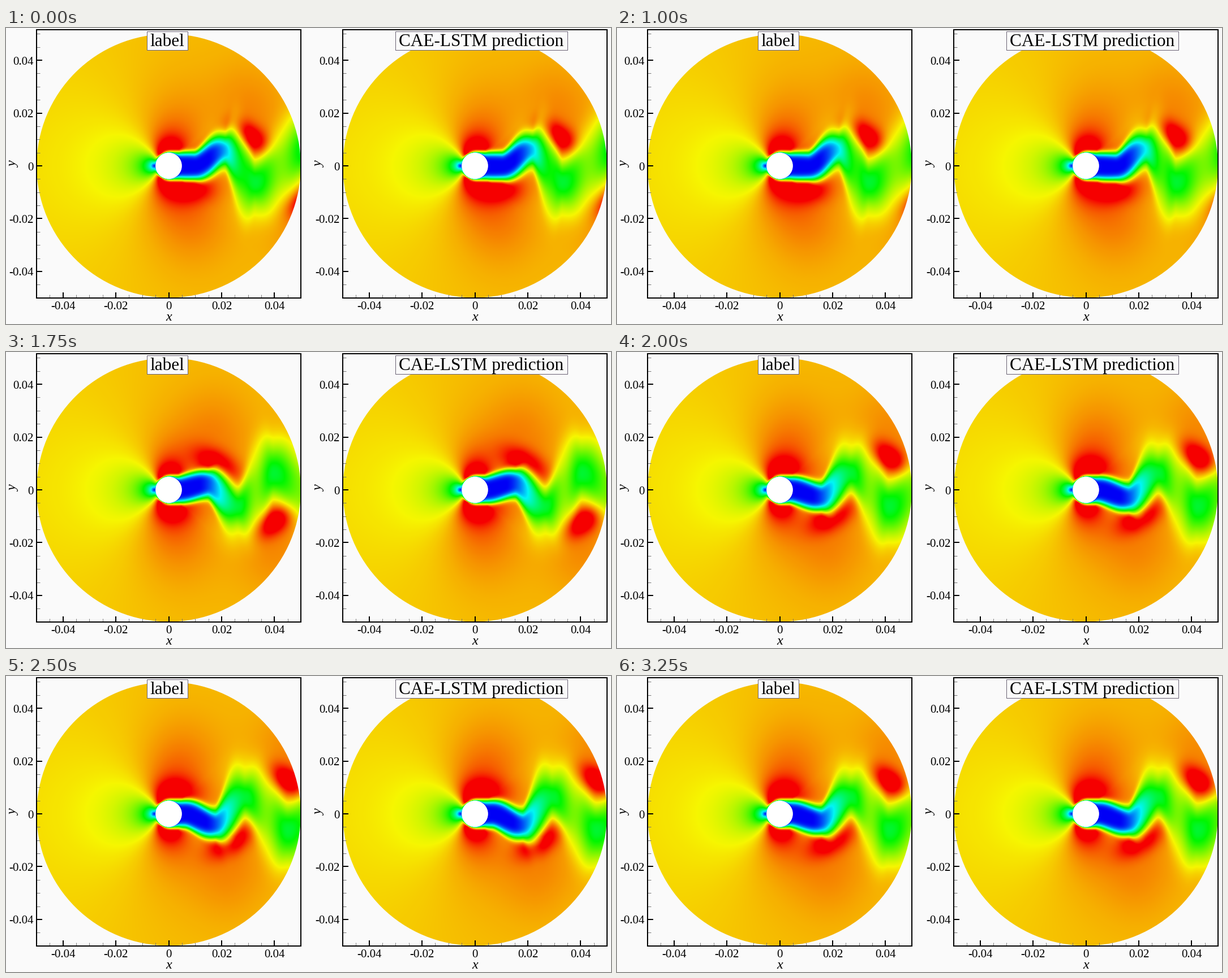
Animation of 1069x524 px, one loop 3.5 s. Source, as a matplotlib script:

```python
import numpy as np
import matplotlib.pyplot as plt
from matplotlib.animation import FuncAnimation
from matplotlib.colors import LinearSegmentedColormap
from matplotlib.patches import Circle, Rectangle

W, H, DPI = 1069, 524, 64
STEPS = 14
R = 23.3            # cylinder radius in pixels
DISK = 233.4        # radius of the flow domain
UNIT = 23.37        # pixels per 0.005 on the axes
HALF = 102.5        # half of the vortex spacing
CX, CY = 287.5, 244
PAPER = "#fafafa"
SERIF = "Liberation Serif"

rainbow = LinearSegmentedColormap.from_list(
    "rainbow5",
    [(0, 0, .965), (0, .965, .965), (0, .965, 0), (.965, .965, 0), (.965, 0, 0)],
    N=1024)

xs = np.arange(-233.5, 234)
X, Y = np.meshgrid(xs, -xs)


def px(size):
    return size * 72 / DPI


def bump(x, y, sx, sy):
    return np.exp(-(x / sx) ** 2 / 2 - (y / sy) ** 2 / 2)


def ramp(x, start, end):
    t = np.clip((x - start) / (end - start), 0, 1)
    return t * t * (3 - 2 * t)


def phase_at(n):
    """Distance travelled by the vortex street, a bit over HALF per step."""
    return np.interp(n, [0, 2, 4, 7, 9, 11, 13],
                     [141, 326, 560, 903, 1123, 1348, 1628])


def outer_flow():
    """Potential flow round a cylinder plus a source for its wake."""
    r2 = np.maximum(X ** 2 + Y ** 2, R ** 2)
    q = R ** 2 / r2
    c = (X ** 2 - Y ** 2) / r2
    c = np.where((X > 0) & (c > 0), .3 * c, c)
    u = 1 - q * c + 5.5 * X / r2
    v = -2 * q * X * Y / r2 + 5.5 * Y / r2
    layer = 1 - np.exp(-(np.sqrt(r2) - R + .3) / 1.6)
    return np.hypot(u, v) / 1.25 * layer


OUTER = outer_flow()


def slow_spot(age):
    """Slow side of a vortex: forms behind the cylinder, then drifts."""
    return np.maximum(78 + .53 * age, age), 29 * ramp(age, -70, 60)


def fast_spot(age):
    """Fast side of a vortex: clings to the cylinder, then drifts."""
    return 10 + 18 * np.logaddexp(0, (age - 10) / 18), 37 + .1 * age


def wake(phase, ages, signs):
    """Value along the slow band and its blending mask."""
    kx, ky = slow_spot(ages)
    ky = -signs * ky
    i = np.clip(np.searchsorted(kx, xs) - 1, 0, len(kx) - 2)
    t = np.clip((xs - kx[i]) / (kx[i + 1] - kx[i]), 0, 1)
    yc = ky[i] + (ky[i + 1] - ky[i]) * ramp(t, 0, 1)
    slope = np.gradient(yc, xs)

    tip = 60 - 9 + 17 * abs(np.sin(np.pi * (phase - 83) / HALF))
    val = .45 * ramp(xs, tip, tip + 75)
    val = val + .17 * ramp(ages[i], 0, 90) * np.sin(np.pi * t) ** 2

    width = 25 + 18 * ramp(xs, 60, 220)
    power = 5 - 2.8 * ramp(xs, 20, 120)
    d = np.abs(Y - yc) / np.sqrt(1 + slope ** 2)
    return val, np.exp(-(d / width) ** power) * ramp(xs, -20, 4)


def field(phase):
    ks = np.arange(-4, 4)
    ages = phase % (2 * HALF) + HALF * ks
    signs = np.where(ks % 2 == 0, 1, -1)
    s = OUTER.copy()
    for age, sign in zip(ages, signs):
        x, y = fast_spot(age)
        dx, dy = X - x, sign * Y - y
        tilt = .4 * ramp(age, 30, 100)
        s += .27 * ramp(age, -110, 120) * bump(dx, dy + tilt * dx, 28 - .03 * age, 17)
        s += .045 * ramp(age, -100, 20) * bump(dx, dy - 45, 45, 58)
        x, y = slow_spot(age)
        s -= .08 * ramp(age, 0, 100) * bump(X - x, -sign * Y - y - 38, 24, 27)
    val, mask = wake(phase, ages, signs)
    s = np.clip(s, 0, 1.1)
    return np.clip(s * (1 - mask) + val * mask, 0, 1)


fig = plt.figure(figsize=(W / DPI, H / DPI), dpi=DPI, facecolor=PAPER)
ax = fig.add_axes([0, 0, 1, 1])
ax.axis("off")


def line(x0, y0, x1, y1, width, color):
    ax.plot([x0, x1], [y0, y1], color=color, lw=px(width),
            solid_capstyle="butt", zorder=4)


def text(x, y, s, size, ha="center", **kw):
    ax.text(x, y, s, fontsize=px(size), family=SERIF, color="black",
            ha=ha, zorder=7, **{"va": "baseline", **kw})


def panel(dx, title, half_box):
    cx = CX + dx
    im = ax.imshow(field(phase_at(0)), cmap=rainbow, vmin=0, vmax=1,
                   extent=(cx - 234, cx + 234, CY + 234, CY - 234),
                   interpolation="bilinear", zorder=1)
    im.set_clip_path(Circle((cx, CY), DISK, transform=ax.transData))
    ax.add_patch(Circle((cx, CY), R, fc="white", ec="none", zorder=3))

    left, right, top, bottom = 54 + dx, 521 + dx, 3, 478
    for k in range(-9, 11):
        off = k * UNIT
        major = k % 4 == 0
        size, width, color = (10, 2, "black") if major else (6, 1, "#777777")
        if k < 10:
            line(cx + off, bottom, cx + off, bottom - size, width, color)
        line(left, CY - off, left + size, CY - off, width, color)
        if major:
            name = f"{k * .005:.2f}" if k else "0"
            text(cx + off, 498.5, name, 21)
            text(49 + dx, CY - off + 7.5, name, 21, ha="right")
    ax.add_patch(Rectangle((left, top), right - left, bottom - top, fill=False,
                           ec="black", lw=px(2), zorder=5))
    text(cx, 517.5, "x", 24, style="italic")
    text(13 + dx, 240.5, "y", 24, style="italic", rotation=90, va="center")

    mid = cx - 2.5 if dx == 0 else cx + 11
    ax.add_patch(Rectangle((mid - half_box, 5.5), 2 * half_box, 33, fc=PAPER,
                           ec="#6a6274", lw=px(1), zorder=6))
    text(mid, 32, title, 31.3)
    return im


label = panel(0, "label", 36)
guess = panel(541, "CAE-LSTM prediction", 152)
ax.set_xlim(0, W)
ax.set_ylim(H, 0)
ax.set_aspect("auto")


def update(n):
    label.set_data(field(phase_at(n)))
    guess.set_data(field(phase_at(n) + 4))
    return label, guess


anim = FuncAnimation(fig, update, frames=STEPS, interval=250,
                     repeat=True, repeat_delay=0, blit=False)
plt.show()
```
